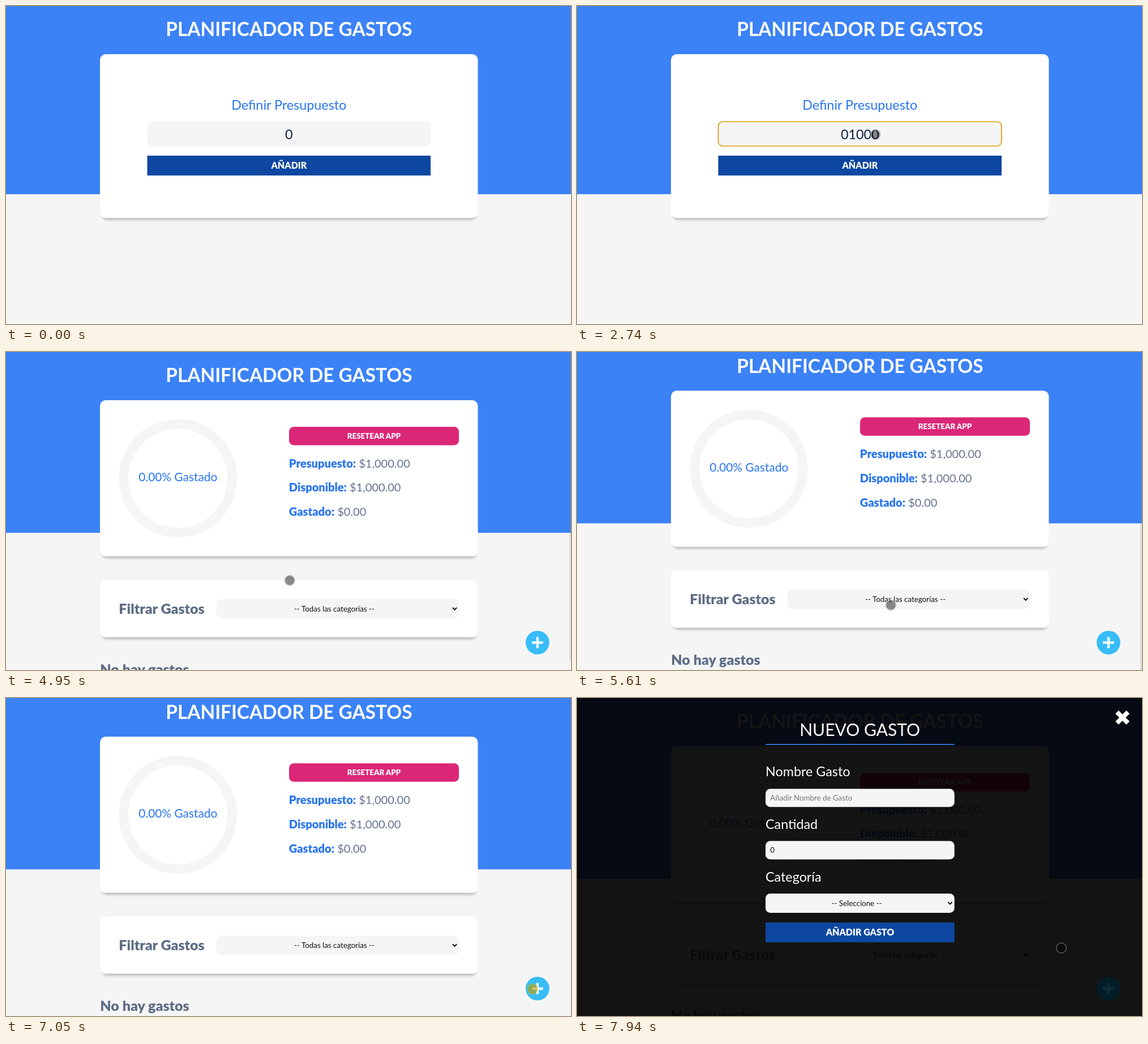
An HTML page for the animation above (7.99 s loop, 998x561 px).

```html
<!DOCTYPE html>
<html lang="es">
<head>
<meta charset="utf-8">
<title>Planificador de gastos</title>
<style>
html, body { margin: 0; width: 100%; height: 100%; overflow: hidden; background: #f5f5f5; }
svg { display: block; width: 998px; height: 561px; font-family: Lato, sans-serif; font-size: 13.34px; }
.mid { text-anchor: middle; }
.black { font-weight: 900; }
.title { font-size: 33.36px; font-weight: 700; fill: #fff; }
.field { font-size: 23.35px; }
.azure { fill: #2875f0; }
.slate { fill: #64748b; }
.head { font-size: 25.02px; font-weight: 900; fill: #5d6d86; }
.line { font-size: 20.02px; }
.send { font-size: 16px; font-weight: 900; fill: #fff; }
.arrow { fill: none; stroke: #111; stroke-width: 2; }
</style>
</head>
<body>
<svg viewBox="0 0 998 561" xmlns="http://www.w3.org/2000/svg">
  <defs>
    <filter id="soft" x="-5%" y="-20%" width="110%" height="150%"><feGaussianBlur stdDeviation="2.4"/></filter>
  </defs>
  <rect width="998" height="561" fill="#f5f5f5"/>
  <g id="page">
    <rect id="header" y="-20" width="998" fill="#3b82f6"/>
    <text class="title mid" x="499.9" y="53.3">PLANIFICADOR DE GASTOS</text>
    <g id="setup">
      <g class="card" data-y="85" data-h="289"></g>
      <text class="field azure mid" x="499.75" y="182.5">Definir Presupuesto</text>
      <rect id="input" x="249.5" y="204" width="500.5" height="43" rx="8.3" fill="#f5f5f5"/>
      <text id="digits" class="field mid" x="499.75" y="234.5" fill="#0b2545"></text>
      <rect id="caret" y="212" width="1" height="27" fill="#0b2545"/>
      <rect x="249.5" y="264" width="500.5" height="35" fill="#0d47a1"/>
      <text class="send mid" x="499.9" y="287.2">AÑADIR</text>
    </g>
    <g id="panel">
      <g class="card" data-y="85" data-h="275.5"></g>
      <circle cx="303.7" cy="222.8" r="95.9" fill="none" stroke="#f5f5f5" stroke-width="16.7"/>
      <text class="azure mid" x="303.7" y="227.5" font-size="20.85">0.00% Gastado</text>
      <rect x="500" y="132" width="300" height="32.5" rx="8.3" fill="#db2777"/>
      <text class="black mid" x="650" y="152.8" fill="#fff">RESETEAR APP</text>
      <text class="line slate" x="499.8" y="203.6"><tspan class="black azure">Presupuesto:</tspan> $1,000.00</text>
      <text class="line slate" x="499.8" y="246.4"><tspan class="black azure">Disponible:</tspan> $1,000.00</text>
      <text class="line slate" x="499.8" y="289.4"><tspan class="black azure">Gastado:</tspan> $0.00</text>
      <g class="card" data-y="402.3" data-h="101"></g>
      <text class="head" x="199.3" y="462">Filtrar Gastos</text>
      <rect x="371.5" y="436" width="428.5" height="34" rx="8.3" fill="#f5f5f5"/>
      <text class="mid" x="580" y="458" fill="#111">-- Todas las categorías --</text>
      <path class="arrow" d="M789 451l3.6 3.6l3.6-3.6"/>
      <text class="head" x="166.3" y="569">No hay gastos</text>
    </g>
  </g>
  <rect id="bar" x="995" width="3" height="545" fill="#808080" opacity=".2"/>
  <rect id="shade" width="998" height="561" opacity=".92"/>
  <g id="plus">
    <circle id="disc" cx="938.8" cy="512.6" r="20.9"/>
    <path id="cross" d="M929 512.6h19.6M938.8 502.8v19.6" stroke-width="4.2"/>
  </g>
  <path id="close" d="M953.8 24.8l19.4 19.4M973.2 24.8l-19.4 19.4" stroke="#fff" stroke-width="8"/>
  <g id="form" fill="#fff">
    <text class="mid" x="499.6" y="66.8" font-size="30.02">NUEVO GASTO</text>
    <rect x="333" y="81" width="333.7" height="1.7" fill="#3b82f6"/>
    <text class="field" x="333" y="138.2">Nombre Gasto</text>
    <rect x="333" y="160.3" width="333.7" height="32" rx="8.3" fill="#f5f5f5"/>
    <text x="341.3" y="181" fill="#757575">Añadir Nombre de Gasto</text>
    <text class="field" x="333" y="230.8">Cantidad</text>
    <rect x="333" y="252.3" width="333.7" height="32.4" rx="8.3" fill="#f5f5f5"/>
    <text x="341.3" y="273" fill="#111">0</text>
    <text class="field" x="333" y="323.6">Categoría</text>
    <rect x="333" y="345" width="333.7" height="34" rx="8.3" fill="#f5f5f5"/>
    <text class="mid" x="494" y="367" fill="#111">-- Seleccione --</text>
    <path class="arrow" d="M655.4 360l3.6 3.6l3.6-3.6"/>
    <rect x="333" y="396" width="333.7" height="35" fill="#0d47a1"/>
    <text class="send mid" x="500" y="419">AÑADIR GASTO</text>
  </g>
  <g id="pointer">
    <circle id="dot" r="8.6"/>
    <circle id="ring" r="8.8" fill="none"/>
  </g>
</svg>
<script>
const LOOP = 7990;
const $ = id => document.getElementById(id);
const set = (id, attrs) => { for (const k in attrs) $(id).setAttribute(k, attrs[k]); };
const show = (id, on) => set(id, { visibility: on ? 'visible' : 'hidden' });
const within = (t, a, b) => t >= a && t < b;
const clamp = v => Math.max(0, Math.min(1, v));

const bursts = [
  [70, 250, 5], [540, 650, 3], [2890, 2980, 3], [3870, 3910, 2], [4330, 5090, 15],
  [5140, 5890, 17], [5940, 6720, 17], [6810, 7050, 5], [7700, 7940, 6]
];
// Pointer path: time, x, y
const path = [
  [70, 901, 549], [115, 645, 330], [160, 560, 250], [205, 529, 219], [250, 518.5, 209],
  [500, 518.5, 209], [595, 524, 221], [650, 527, 227], [2850, 527, 227], [2935, 532, 268],
  [2980, 534, 284], [3850, 534, 284], [3910, 536, 285], [4300, 536, 285], [4550, 511, 315],
  [4850, 498, 393], [5140, 510, 430], [5610, 554.5, 446.5], [5700, 585, 413], [5890, 624, 330],
  [6150, 700, 179], [6400, 786, 312], [6720, 920, 476], [6980, 930, 513.3], [7700, 930, 513.3],
  [7940, 855.5, 441]
];

function snap(t) {
  let out = 0;
  for (const [a, b, n] of bursts) {
    if (t < a) break;
    const step = (b - a) / (n - 1);
    out = a + step * Math.min(n - 1, Math.floor((t - a) / step + 1e-6));
  }
  return out;
}

function along(t) {
  const i = path.findIndex(p => p[0] > t);
  if (i === 0) return path[0].slice(1);
  if (i < 0) return path[path.length - 1].slice(1);
  const [a, b] = [path[i - 1], path[i]];
  const k = (t - a[0]) / (b[0] - a[0]);
  return [1, 2].map(j => a[j] + (b[j] - a[j]) * k);
}

// Approximates cubic-bezier(.42, 0, 1, 1)
const easeIn = p => Math.pow(p, 1.8);

function drawPointer(t, ts, modal) {
  const [x, y] = along(ts);
  const pressed = within(t, 400, 540) || within(t, 3120, 3220) || within(t, 6980, 7140);
  const glow = within(t, 7140, 7740);
  show('pointer', t >= 70);
  set('pointer', { transform: `translate(${x} ${y})` });
  set('dot', { fill: pressed ? 'rgba(185,155,0,.62)' : 'rgba(0,0,0,.46)' });
  set('ring', {
    stroke: glow ? '#e6e67c' : pressed ? 'rgba(190,190,50,.5)' : `rgba(185,185,185,${modal ? .45 : .6})`,
    'stroke-width': glow ? 1.3 : modal ? 1.6 : 2
  });
}

function draw(t) {
  const ts = snap(t);
  const budget = t >= 3220, modal = t >= 7140;
  const p = clamp((ts - 4940) / 200);
  const scroll = modal ? 0 : 16.7 * (1 - (1 - p) * (1 - p));

  set('page', { transform: `translate(0 ${-scroll})` });
  set('header', { height: budget ? 339 : 352 });
  $('setup').style.display = budget ? 'none' : '';
  $('panel').style.display = budget ? '' : 'none';

  const count = 1 + [1530, 1860, 2090, 2230].filter(k => t >= k).length;
  $('digits').textContent = '01000'.slice(0, count);
  set('input', { stroke: t >= 400 ? '#e29a12' : 'none', 'stroke-width': 1.7 });
  set('caret', { x: Math.floor(499.75 + 6.77 * count) });
  $('caret').style.display = within(t, 400, 1300) || within(t, 1530, 2740) ? '' : 'none';

  show('bar', within(t, 4330, 5850));
  set('bar', { y: scroll * .97 });
  show('plus', t >= 3360);
  set('disc', { fill: modal ? '#031d27' : '#38bdf8' });
  set('cross', { stroke: modal ? '#0d303b' : '#fff' });
  show('shade', modal);
  show('close', t >= 7290);
  set('form', { opacity: t < 7700 ? 0 : easeIn(clamp((ts - 7610) / 300)) });
  drawPointer(t, ts, modal);
}

for (const card of document.querySelectorAll('.card')) {
  const y = +card.dataset.y, h = +card.dataset.h;
  card.innerHTML =
    `<rect x="170" y="${y + 6}" width="660" height="${h - 3}" rx="8" opacity=".27" filter="url(#soft)"/>` +
    `<rect x="166" y="${y}" width="667.5" height="${h}" rx="10" fill="#fff"/>`;
}

const start = performance.now();
function tick() {
  draw((performance.now() - start) % LOOP);
  requestAnimationFrame(tick);
}
tick();
</script>
</body>
</html>
```
